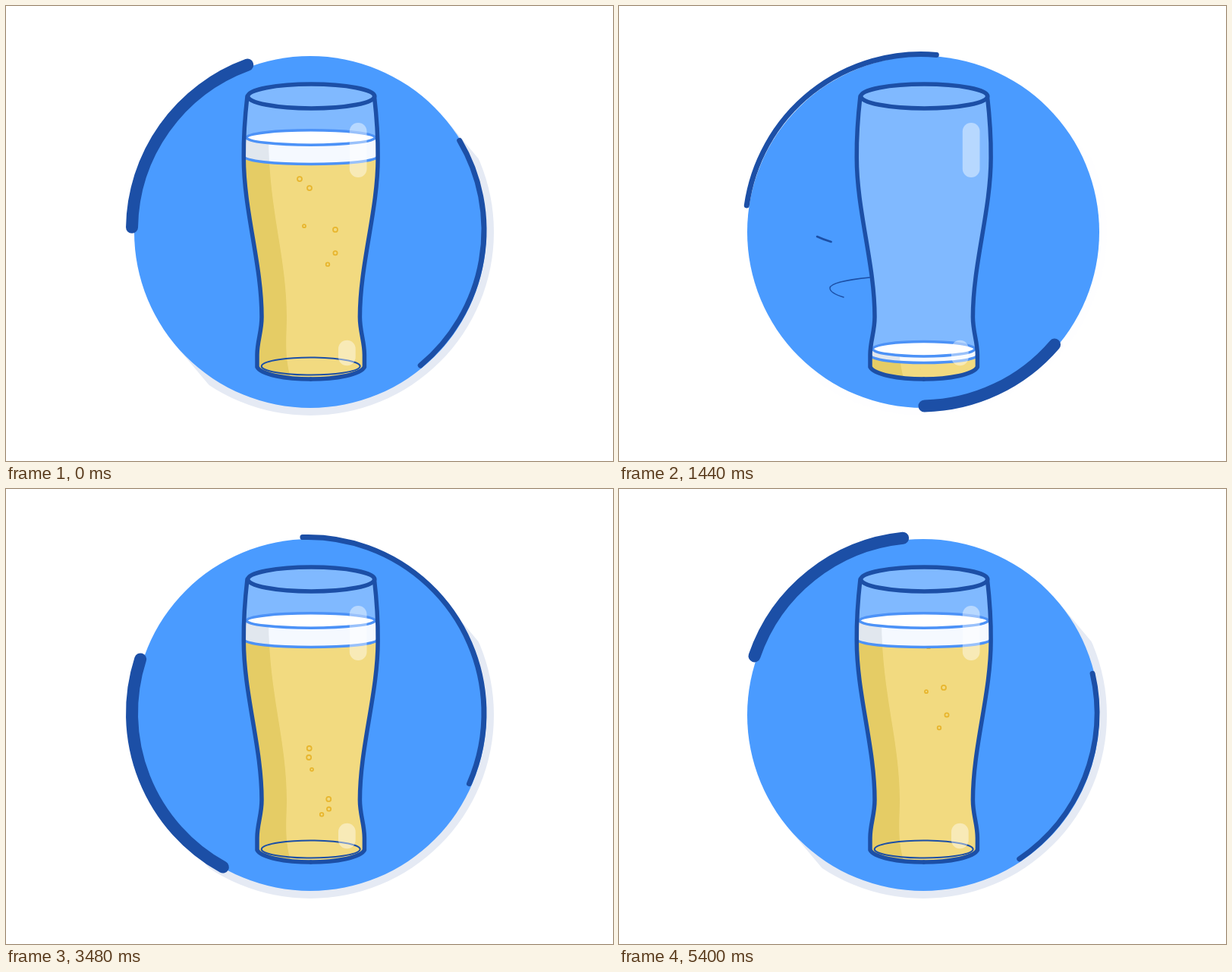
These frames come from a looping animation (800x600 px, 5.44 s). An HTML page with a canvas:

```html
<!DOCTYPE html>
<html lang="en">
<head>
<meta charset="utf-8">
<title>Glass of beer</title>
<style>
html, body { margin: 0; width: 100%; height: 100%; overflow: hidden; background: #fff; }
canvas { display: block; }
</style>
</head>
<body>
<canvas id="stage" width="800" height="600"></canvas>
<script>
const ctx = document.getElementById('stage').getContext('2d');
const LOOP = 5440, POSTER = 4970, TAU = Math.PI * 2, CX = 401.7;
const NAVY = '#1c4fa6', BLUE = '#4a9bff', LINE = '#4c92f7';

const clamp = v => Math.max(0, Math.min(1, v));
const ramp = (t, a, b) => clamp((t - a) / (b - a));
const mix = (a, b, p) => a + (b - a) * p;
const smooth = u => u * u * (3 - 2 * u);
const cubic = u => u < 0.5 ? 4 * u ** 3 : 1 - 4 * (1 - u) ** 3;
const ease = (t, a, b) => cubic(ramp(t, a, b));

// Smooth curve through values at uneven times
function curve(t, times, vals) {
  const n = times.length;
  if (t <= times[0]) return vals[0];
  if (t >= times[n - 1]) return vals[n - 1];
  let i = 0;
  while (t > times[i + 1]) i++;
  const slope = k => {
    const a = Math.max(0, k - 1), b = Math.min(n - 1, k + 1);
    return (vals[b] - vals[a]) / (times[b] - times[a]);
  };
  const h = times[i + 1] - times[i], u = (t - times[i]) / h, s = smooth(u);
  return mix(vals[i], vals[i + 1], s)
    + h * u * (1 - u) * ((1 - u) * slope(i) - u * slope(i + 1));
}

const side = new Path2D('M401.7 492C368 492 336 486 331 476L331 460C331 442 337 430 337 410' +
  'C337 340 313.3 270 313.3 200C313 172 315 145 318 119');
const mirror = new DOMMatrix([-1, 0, 0, 1, 2 * CX, 0]);
const otherSide = new Path2D();
otherSide.addPath(side, mirror);
const glass = new Path2D('M318 119C315 145 313 172 313.3 200C313.3 270 337 340 337 410' +
  'C337 430 331 442 331 460L331 476C336 486 368 492 401.7 492C435.4 492 467.4 486 472.4 476' +
  'L472.4 460C472.4 442 466.4 430 466.4 410C466.4 340 490.1 270 490.1 200' +
  'C490.4 172 488.4 145 485.4 119C484 98 319 98 318 119Z');
const shade = new Path2D('M300 170L346 170C346 270 370 330 370 410C370 436 366 460 376 494L300 494Z');
const swirlTop = new Path2D('M261 304C280 313 310 319 339 323');
const swirlLow = new Path2D('M331 358C300 361 278 366 278 372C278 377 286 381 296 384');

function stroke(path, color, width, from, to) {
  if (to <= from) return;
  ctx.strokeStyle = color;
  ctx.lineWidth = width;
  ctx.setLineDash([to - from, 9999]);
  ctx.lineDashOffset = -from;
  ctx.stroke(path);
  ctx.setLineDash([]);
}

function oval(x, y, rx, ry, a = 0, b = TAU) {
  ctx.beginPath();
  ctx.ellipse(x, y, rx, ry, 0, a, b);
}

function outline(color, width) {
  ctx.strokeStyle = color;
  ctx.lineWidth = width;
  ctx.stroke();
}

function halfWidth(y) {
  if (y < 200) return 88.4 - 4.7 * ((200 - y) / 81) ** 2;
  if (y < 410) return 88.4 - 23.7 * smooth((y - 200) / 210);
  return 64.7 + 6 * smooth(ramp(y, 410, 460));
}

function drawDisc(t) {
  const fade = smooth(ramp(t, 1300, 2300));
  if (fade > 0) {
    ctx.save();
    ctx.globalAlpha = fade;
    oval(401, 298, 242, 242);
    ctx.clip();
    ctx.translate(401, 298);
    ctx.rotate(Math.atan2(25, 21));
    ctx.fillStyle = '#e5eaf4';
    ctx.fillRect(0, -232, 250, 464);
    ctx.restore();
  }
  const r = 232 * ease(t, 80, 960);
  if (r > 0) {
    oval(401, 298, r, r);
    ctx.fillStyle = BLUE;
    ctx.fill();
  }
}

const arcTimes = [800, 1440, 2080, 2880, 4080, POSTER, 5400];
const arcs = [
  { width: 7, tail: [163.5, 188, 212.8, 243.9, 292.8, 329.4, 347],
    head: [163.5, 274.9, 325.3, 365.3, 397.6, 410.3, 416] },
  { width: 16, tail: [18, 40.6, 63.4, 94.4, 143.7, 180.9, 198.9],
    head: [18, 88.8, 140.4, 175.4, 219.1, 249.9, 264.1] }
];

function drawArcs(t) {
  if (t <= arcTimes[0]) return;
  for (const arc of arcs) {
    const a = curve(t, arcTimes, arc.tail), b = curve(t, arcTimes, arc.head);
    oval(398, 295.5, 232, 232, a * TAU / 360, b * TAU / 360);
    outline(NAVY, arc.width);
  }
}

function drawSwirls(t) {
  const from = 81 * (t < 600 ? mix(1, 0.28, ramp(t, 520, 600)) : mix(0.28, 0, ease(t, 600, 1400)));
  const to = 81 * (t < 1440 ? mix(1, 0.25, ease(t, 600, 1440)) : mix(0.25, 0, ramp(t, 1440, 1540)));
  stroke(swirlTop, NAVY, 2.5, from, to);
  stroke(swirlLow, NAVY, 1.4, 81 * ramp(t, 1440, 1600), 81 * ramp(t, 1300, 1440));
}

// r, height at 2880 ms, rise in px per second, sideways drift
const driftTimes = [2080, 2880, 4080, POSTER, 5400];
const bubbles = [
  [3, 388, 76.5, [394, 392, 405, 387, 394]],
  [3, 400, 76.5, [403, 404, 395, 400, 408]],
  [2, 402, 53.5, [397, 400, 404, 393, 405]],
  [3, 455, 76.6, [421, 421, 430, 434, 428]],
  [2.6, 461, 64.7, [424, 424, 428, 434, 432]],
  [2.3, 465, 59.5, [415, 415, 418, 424, 422]]
];

function drawBeer(t) {
  const p = ease(t, 1020, 2253);
  if (p <= 0) return;
  const top = mix(505, 173.5, p);
  const edge = top + 4 + 21.5 * Math.min(1, p * 1.4);
  const rx = halfWidth(top) - 3, rxEdge = halfWidth(edge) - 1;

  ctx.save();
  ctx.clip(glass);

  // Foam
  ctx.save();
  ctx.beginPath();
  ctx.rect(300, top, 205, 400);
  ctx.clip();
  ctx.fillStyle = '#f5f9ff';
  ctx.fillRect(300, top, 205, 400);
  ctx.fillStyle = '#e1e7ee';
  ctx.fill(shade);
  ctx.restore();

  // Beer below the foam edge
  ctx.save();
  ctx.beginPath();
  ctx.ellipse(CX, edge, rxEdge, 9.5, 0, Math.PI, 0, true);
  ctx.lineTo(505, edge);
  ctx.lineTo(505, 500);
  ctx.lineTo(300, 500);
  ctx.lineTo(300, edge);
  ctx.closePath();
  ctx.clip();
  ctx.fillStyle = '#f2da80';
  ctx.fillRect(300, edge, 205, 400);
  ctx.fillStyle = '#e5cc65';
  ctx.fill(shade);
  const grow = ramp(t, 1400, 1900);
  if (grow > 0) {
    for (const [r, y, speed, drift] of bubbles) {
      oval(curve(t, driftTimes, drift), y - speed * (t - 2880) / 1000, r * grow, r * grow);
      outline('#e8b62e', 1.8 * grow);
    }
  }
  ctx.restore();

  oval(CX, edge, rxEdge, 9.5, 0, Math.PI);
  outline(LINE, 3.5);
  oval(CX, top, rx, 9.7);
  ctx.fillStyle = '#fff';
  ctx.fill();
  outline(LINE, 3.5);
  ctx.restore();
}

function drawShine(x, y, w, h, p) {
  if (p <= 0) return;
  const tall = h * p;
  ctx.fillStyle = 'rgba(255,255,255,.43)';
  ctx.beginPath();
  ctx.roundRect(x, y - tall / 2, w, tall, Math.min(w, tall) / 2);
  ctx.fill();
}

function drawGlass(t) {
  const fade = smooth(ramp(t, 600, 1080));
  if (fade > 0) {
    ctx.globalAlpha = fade;
    ctx.fillStyle = '#80b9ff';
    ctx.fill(glass);
    ctx.globalAlpha = 1;
  }
  drawBeer(t);

  const base = ease(t, 1680, 2360);
  if (base > 0) {
    const mid = 0.08, half = Math.PI * base;
    oval(401.7, 475, 65, 11.5, mid - half, mid + half);
    outline(NAVY, 2);
  }

  const rim = ease(t, 400, 815);
  if (rim > 0) {
    oval(402.3, 119, 83.5, 16, 0, 0);
    ctx.beginPath();
    ctx.ellipse(402.3, 119, 83.5, 16, 0, Math.PI, Math.PI - TAU * rim, true);
    outline(NAVY, 5.5);
  }

  const body = ease(t, 510, 1160);
  const len = body < 1 ? 460 * body : 2000;
  stroke(side, NAVY, 5.5, 0, len);
  stroke(otherSide, NAVY, 5.5, 0, len);

  drawShine(438, 457.5, 22.7, 33.5, ease(t, 560, 980));
  drawShine(452.8, 190, 22.7, 72, ease(t, 640, 1060));
}

function draw(t) {
  ctx.fillStyle = '#fff';
  ctx.fillRect(0, 0, 800, 600);
  ctx.lineCap = 'round';
  ctx.lineJoin = 'round';
  drawDisc(t);
  drawArcs(t);
  drawSwirls(t);
  drawGlass(t);
}

const begin = performance.now();
function tick() {
  const t = (performance.now() - begin) % LOOP;
  draw(t < 40 ? POSTER : t);
  requestAnimationFrame(tick);
}
tick();
</script>
</body>
</html>
```
